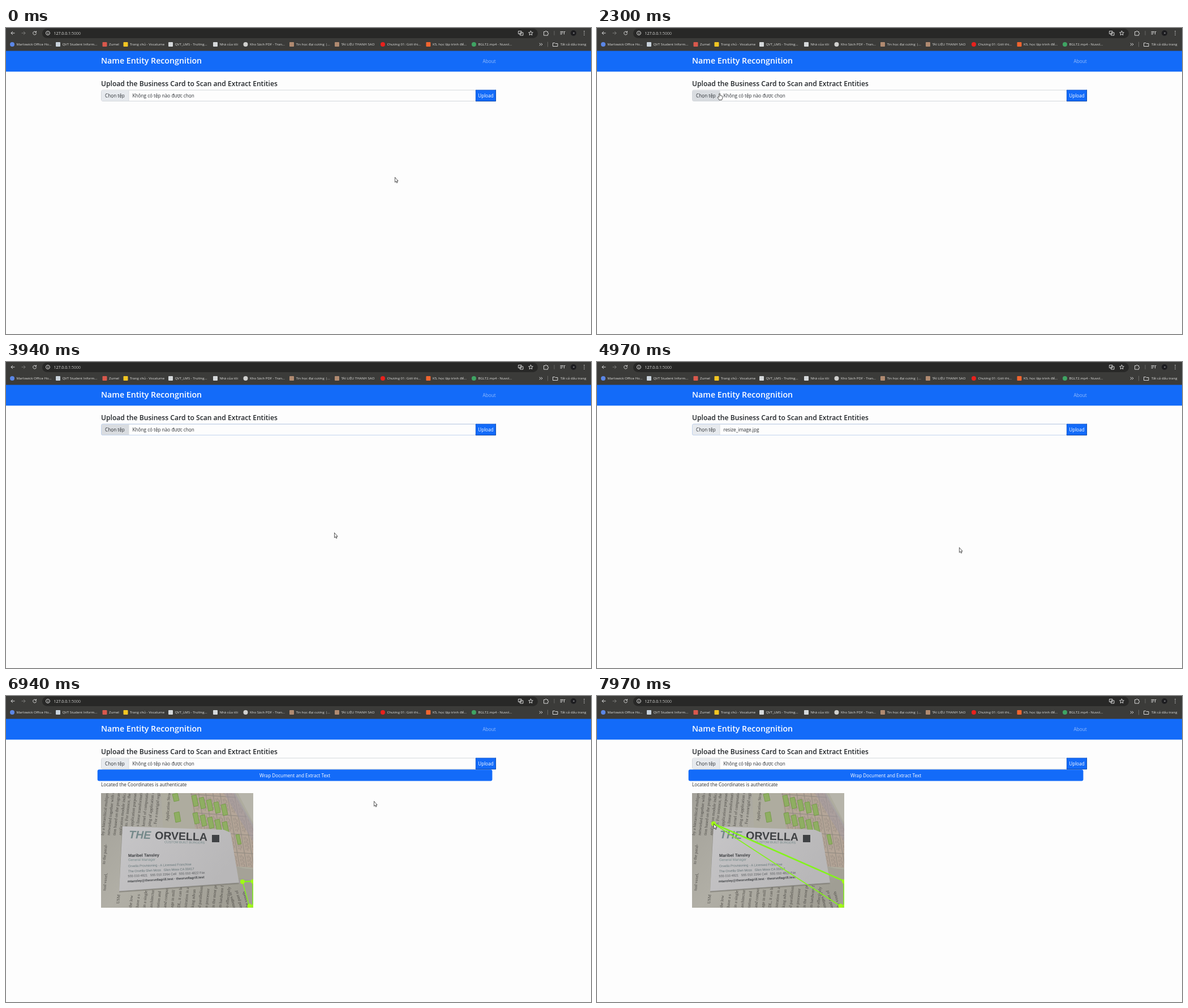
Recreate the animation shown at these times as an HTML page. Size 1034 by 542 pixels, loop 8 s.

```html
<!DOCTYPE html>
<html lang="vi">
<head>
<meta charset="utf-8">
<title>Name Entity Recongnition</title>
<style>
  html, body { margin: 0; width: 100%; height: 100%; overflow: hidden; background: #fdfdfd; }
  svg { display: block; width: 1034px; height: 542px; }
  text { font-family: "Open Sans", "Noto Sans", sans-serif; white-space: pre; }
  .body { font-size: 8.2px; fill: #2a2e33; }
  .mark { font-size: 6.15px; fill: #e0e0de; }
  .icon { fill: none; stroke: #d8d8d8; stroke-width: 1; stroke-linecap: round; }
  .print text { font: 7.4px "Liberation Serif", serif; fill: #4b4945; }
  .card text { font-family: "Liberation Sans", Arial, sans-serif; }

  /* one shared 8 s clock */
  .t { animation: 8s infinite step-end; }
  .result { animation-name: result; }
  .empty  { animation-name: empty; }
  .file   { animation-name: file; }
  .hover  { animation-name: hover; }
  .focus  { animation-name: focus; }
  .busy   { animation-name: busy; }
  .idle   { animation-name: idle; }
  .hand   { animation-name: hand; }
  .arrow  { animation-name: arrow; }
  @keyframes result { 0% { opacity: 0 } 83.6%, 100% { opacity: 1 } }
  @keyframes empty  { 0% { opacity: 1 } 57.5% { opacity: 0 } 83.6%, 100% { opacity: 1 } }
  @keyframes file   { 0% { opacity: 0 } 57.5% { opacity: 1 } 83.6%, 100% { opacity: 0 } }
  @keyframes hover  { 0% { opacity: 0 } 27.7% { opacity: 1 } 57.5%, 100% { opacity: 0 } }
  @keyframes focus  { 0% { opacity: 0 } 30.2% { opacity: 1 } 83.6%, 100% { opacity: 0 } }
  @keyframes busy   { 0% { opacity: 0 } 68.3% { opacity: 1 } 83.6%, 100% { opacity: 0 } }
  @keyframes idle   { 0% { opacity: 1 } 68.3% { opacity: 0 } 83.6%, 100% { opacity: 1 } }
  @keyframes hand   { 0% { opacity: 0 } 27.7% { opacity: 1 } 42.3% { opacity: 0 }
                      66.9% { opacity: 1 } 68.9%, 100% { opacity: 0 } }
  @keyframes arrow  { 0% { opacity: 1 } 27.7% { opacity: 0 } 42.3% { opacity: 1 }
                      66.9% { opacity: 0 } 68.9%, 100% { opacity: 1 } }

  .pointer { animation: pointer 8s infinite ease-in-out; }
  @keyframes pointer {
    0% { transform: translate(687px, 264px) }
    10.88% { transform: translate(667px, 191px) }
    20.9% { transform: translate(600px, 376px); animation-timing-function: ease-out }
    23.5% { transform: translate(470px, 506px) }
    27.8% { transform: translate(220px, 118px) }
    28.7%, 42.2% { transform: translate(216px, 115px) }
    49.25% { transform: translate(580px, 302px) }
    52.5% { transform: translate(625px, 350px) }
    58% { transform: translate(632px, 345px) }
    62.5% { transform: translate(640px, 328px) }
    67.2%, 68.6% { transform: translate(845px, 118px) }
    73.3% { transform: translate(660px, 185px) }
    86.7%, 88% { transform: translate(650px, 186px) }
    93.4%, 94% { transform: translate(417px, 329px) }
    99.6%, 100% { transform: translate(206px, 226px) }
  }
  .knob { animation: knob 8s infinite ease-in-out; }
  @keyframes knob {
    0%, 94% { transform: translate(418px, 329px) }
    99.6%, 100% { transform: translate(206px, 226px) }
  }
  .top { animation: top 8s infinite ease-in-out; }
  @keyframes top {
    0%, 94% { d: path("M418 329L437 328") }
    99.6%, 100% { d: path("M206 226L437 328") }
  }
  .side { animation: side 8s infinite ease-in-out; }
  @keyframes side {
    0%, 94% { d: path("M418 329L430 372") }
    99.6%, 100% { d: path("M206 226L430 372") }
  }
</style>
</head>
<body>
<svg viewBox="0 0 1034 542" xmlns="http://www.w3.org/2000/svg">
  <defs>
    <clipPath id="frame"><rect x="168" y="172" width="269" height="203"/></clipPath>
    <linearGradient id="paper" x2="1" y2=".7">
      <stop offset="0" stop-color="#a3a199"/><stop offset=".5" stop-color="#b1afa6"/><stop offset="1" stop-color="#a09e94"/>
    </linearGradient>
    <linearGradient id="stock" x2="1" y2=".4">
      <stop offset="0" stop-color="#c6c5c7"/><stop offset="1" stop-color="#b8b7b8"/>
    </linearGradient>
    <pattern id="cells" width="13" height="32" patternUnits="userSpaceOnUse" patternTransform="translate(328 174) skewY(14) rotate(-10)">
      <rect width="13" height="32" fill="#918a80"/>
      <rect x=".6" y=".6" width="11.800" height="30.800" fill="#b5a698"/>
      <path d="M4 4v22M7 3v25M9.500 6v18" stroke="#8b8079" stroke-width=".8" stroke-dasharray="5 1.500"/>
    </pattern>
  </defs>

  <!-- browser -->
  <rect width="1034" height="41" fill="#3b3b39"/>
  <rect x="64" y="1" width="876" height="17" rx="8.5" fill="#282827"/>
  <g class="icon">
    <path d="M15 9H9m2.600-2.600L9 9l2.600 2.600"/>
    <path d="M28 9h6m-2.600-2.600L34 9l-2.600 2.600" stroke="#7d7d7b"/>
    <path class="t idle" d="M53.200 7.400A3 3 0 1 0 53.600 9.800M53.500 5.800v2h-2"/>
    <path class="t busy" d="M48.300 6.700l4.600 4.600m0-4.600l-4.600 4.600"/>
    <circle cx="74" cy="9" r="3.500"/>
    <path d="M74 8.800v2M74 7.100v.1"/>
    <path d="M906 5.500h5v5h-5zM909 8h5v5h-5z"/>
    <path d="M927.500 5.200l1.100 2.600 2.800.2-2.100 1.800.6 2.800-2.400-1.500-2.400 1.500.6-2.800-2.100-1.800 2.800-.2z"/>
    <path d="M951 6.500h2.200a1.200 1.200 0 0 1 2.400 0h2v2.200a1.200 1.200 0 0 1 0 2.400v2H951z"/>
    <path d="M969 5.500v7" stroke="#696967"/>
    <path d="M980 6.500h5M980 8.700h4M980 10.900h2.500M986.500 11V6.500h1.500"/>
    <path d="M943 27l2 2-2 2M946 27l2 2-2 2"/>
    <path d="M957.500 25v8" stroke="#696967"/>
    <path d="M967 26.500h3l1 1h4v5h-8z"/>
  </g>
  <circle cx="1003" cy="9" r="5" fill="#1d1d20"/>
  <circle cx="1003.500" cy="9" r="1.300" fill="#77777a"/>
  <path d="M1022 5.800v.1M1022 9v.1M1022 12.200v.1" stroke="#dcdcdc" stroke-width="1.500" stroke-linecap="round"/>
  <text x="84.500" y="11.600" font-size="7" fill="#e6e6e4">127.0.0.1<tspan fill="#bdbdbb">:5000</tspan></text>
  <g id="marks"></g>
  <text class="mark" x="980" y="31.300">Tất cả dấu trang</text>

  <!-- page -->
  <rect y="40.500" width="1034" height="36.800" fill="#136bf9"/>
  <text x="168" y="62.700" font-size="14.200" font-weight="600" fill="#fff">Name Entity Recongnition</text>
  <text x="842.500" y="62" font-size="8.200" fill="#94bcfb">About</text>
  <text x="168" y="103" font-size="12.140" font-weight="600" fill="#212529">Upload the Business Card to Scan and Extract Entities</text>

  <rect x="168.500" y="110" width="662" height="19.500" rx="2.500" fill="#fdfdfd" stroke="#d3d7db"/>
  <rect x="169" y="110.500" width="48" height="18.500" fill="#e7eaee"/>
  <rect class="t hover" x="169" y="110.500" width="48" height="18.500" fill="#d9dce0"/>
  <path d="M217 110.500v18.500" stroke="#d3d7db" stroke-width=".8"/>
  <rect class="t focus" x="168.500" y="110" width="662" height="19.500" rx="2.500" fill="none" stroke="#c3d4ee"/>
  <text class="body" x="175" y="123">Chọn tệp</text>
  <text class="body t empty" x="223.500" y="123">Không có tệp nào được chọn</text>
  <text class="body t file" x="223.500" y="123">resize_image.jpg</text>

  <rect x="830.500" y="110" width="35" height="19.500" fill="#136bf9" stroke="#1059d2"/>
  <path d="M830 129.600h35.600V109.500" fill="none" stroke="#0b49ad"/>
  <g class="t busy">
    <rect x="829" y="108.500" width="38" height="22.500" rx="1" fill="#0b5ed7" stroke="#9cc2fb" stroke-width="2"/>
    <rect x="830.500" y="110" width="35" height="19.500" fill="none" stroke="#0a4bab"/>
  </g>
  <text class="body" x="848" y="123" text-anchor="middle" style="fill:#fff">Upload</text>

  <g class="t result">
    <rect x="161.700" y="130.200" width="697.800" height="20.300" rx="3" fill="#136bf9"/>
    <text class="body" x="510.500" y="143.600" text-anchor="middle" style="fill:#fff">Wrap Document and Extract Text</text>
    <text class="body" x="168" y="160">Located the Coordinates is authenticate</text>

    <g clip-path="url(#frame)">
      <rect x="168" y="172" width="269" height="203" fill="url(#paper)"/>
      <path d="M274 172H437V310L400 300 385 240H278z" fill="#aeac9f"/>
      <path d="M326 172h76l35 62v70l-30-2-20-68-52 2z" fill="url(#cells)"/>
      <path d="M385 172h20l32 56v30z" fill="#a19aa4" opacity=".5"/>
      <path d="M410 172h27v52z" fill="#b6b4aa"/>
      <path id="tags" fill="#8fae62" stroke="#6f9a42" stroke-width=".8"/>
      <g class="print" id="print"></g>
      <path d="M405 304l32 3v20l-30-6z" fill="#a5a297"/>
      <path d="M205 235l-5 113 213-15z" fill="#77756d" opacity=".5"/>
      <path d="M206 231L385 237 397 242 412 331 200 346z" fill="url(#stock)"/>
      <path d="M200 346L412 331" stroke="#85837e" stroke-width=".8"/>
      <g class="card" id="card" fill="#47494c">
        <g transform="translate(217 252) rotate(1.800)" font-size="19.500" font-weight="700">
          <text fill="#75898a" font-style="italic">THE</text>
          <text x="46" fill="#3f4144">ORVELLA</text>
        </g>
        <rect x="364" y="246" width="13" height="13" fill="#3f4144"/>
      </g>
      <g fill="none" stroke="#84f31c">
        <path class="side" stroke-width="1.500" d="M418 329L430 372"/>
        <path class="top" stroke-width="2.600" d="M418 329L437 328"/>
        <path stroke-width="3" d="M437 328V372L430 372"/>
      </g>
      <g fill="#a1fa16">
        <circle class="knob" r="4"/>
        <circle cx="437" cy="328.500" r="4"/>
        <circle cx="430.500" cy="372" r="4"/>
        <circle cx="439" cy="372" r="4"/>
      </g>
    </g>
  </g>

  <g class="pointer" fill="#fff" stroke="#222" stroke-width=".8" stroke-linejoin="round">
    <path class="t arrow" d="M.4.400V9.200L2.300 7.500 3.600 10.300 5 9.700 3.700 7H6.200z"/>
    <path class="t hand" d="M-.2 7.500V1.400q.9-1.300 1.800 0v3.200l3.500.7q.9.300.8 1.500l-.4 3-.9 2.700H0L-2.700 8.300q-.2-1.300 1-1.200z"/>
  </g>
</svg>
<script>
  const NS = "http://www.w3.org/2000/svg";
  const add = (parent, tag, attrs, text = "") => {
    const el = document.createElementNS(NS, tag);
    for (const k in attrs) el.setAttribute(k, attrs[k]);
    el.textContent = text;
    document.getElementById(parent).append(el);
  };

  // bookmarks: icon centre, colour, label
  [
    [11, "#5b86e5", "Marlowick Office Ho..."],
    [92, "#c9d3dc", "QVT Student Inform..."],
    [174.5, "#d9584c", "Zumel"],
    [211.5, "#f2c522", "Trang chủ - Vocalume"],
    [291, "#d5d8da", "QVT_LMS - Trường..."],
    [370, "#d5d8da", "Nhà của tôi"],
    [423.5, "#d0d0ce", "Kho Sách PDF - Tran..."],
    [505, "#b08a70", "Tin học đại cương |..."],
    [585, "#b08a70", "TÀI LIỆU THANH SAO"],
    [666, "#e8211d", "Chương 01: Giới thi..."],
    [746.5, "#f0652f", "K5, học lập trình để..."],
    [827, "#3fa463", "BGLT2.mp4 - Nuvol..."],
  ].forEach(([x, fill, label], i) => {
    const round = [0, 6, 9, 11].includes(i);
    add("marks", "rect", { x: x - 4, y: 25, width: 8, height: 8, rx: round ? 4 : 1, fill });
    add("marks", "text", { class: "mark", x: x + 7.4, y: 31.3 }, label);
  });

  // printed page under the card
  const line = (x, y, turn, text) =>
    add("print", "text", { transform: `translate(${x} ${y}) rotate(${turn})` }, text);
  ["by a hierarchical multipro", "networked together with nodes", "tion based on the program", "application module indicates",
   "to. For instance, the linear", "application purposely repre", "s linear transformation of", "kernel of computational ex",
   "ping of application commun", ". For a nonrigid registration"
  ].forEach((s, i) => line(173 + i * 10.3, i < 4 ? 247 : 231, -84, s));
  line(175, 298, -84, "to the paral-");
  line(176, 345, -84, "tual voxel,");
  line(200, 368, -84, "USM");
  line(287, 222, -86, "Application Structure");
  ["the low", "have a s", "in a single", "architectur", "tation and", "and comput", "age in mill", "DL, it can be", "istration is a", "king advan",
   "d parallelism", "n processor", "is the most pr", "m hardware f", "o effectively", "images in", "and part of", "the voxels"
  ].forEach((s, i) => line(222 + i * 12.2, 375, i < 15 ? -84 : -104, s));

  // green labels in the diagram
  let tags = "";
  for (let i = 0; i < 10; i++) {
    const col = i % 5, row = i < 5 ? 0 : 1;
    tags += `M${328 + col * 13 + row * 2} ${177 + col * 4 + row * 31}l8-2 4 19-8 2z`;
  }
  tags += "M294 174l9-2 3 13-9 2zM297 207l9-2 3 17-9 2zM406 246l6-1 4 17-6 1z";
  document.getElementById("tags").setAttribute("d", tags);

  // card lines: x, baseline, tilt, size, weight, colour, text
  [
    [280, 260.5, 1, 5.7, 400, "#75898a", "CUSTOM BUILT BURGERS"],
    [216, 285, -.8, 7.4, 700, "#3b3d40", "Maribel Tansley"],
    [216, 292.3, -.8, 6.2, 400, "#75898a", "General Manager"],
    [216, 303.3, -1.7, 5.8, 400, "#66777a", "Orvella Provisioning - A Licensed Franchise"],
    [216, 312.4, -2.2, 5.7, 400, "#5d6d70", "The Orvella Glen Moss   Glen Moss CA 00417"],
    [215.5, 321, -2.7, 5.7, 400, "#55585b", "555 010 4821   555 010 2264 Cell   555 010 4822 Fax"],
    [215, 330.3, -3.2, 5.8, 700, "#3f4245", "mtansley@theorvellagrill.test · theorvellagrill.test"],
  ].forEach(([x, y, turn, size, weight, fill, text]) =>
    add("card", "text", {
      transform: `translate(${x} ${y}) rotate(${turn})`, "font-size": size, "font-weight": weight, fill,
    }, text));
</script>
</body>
</html>
```
